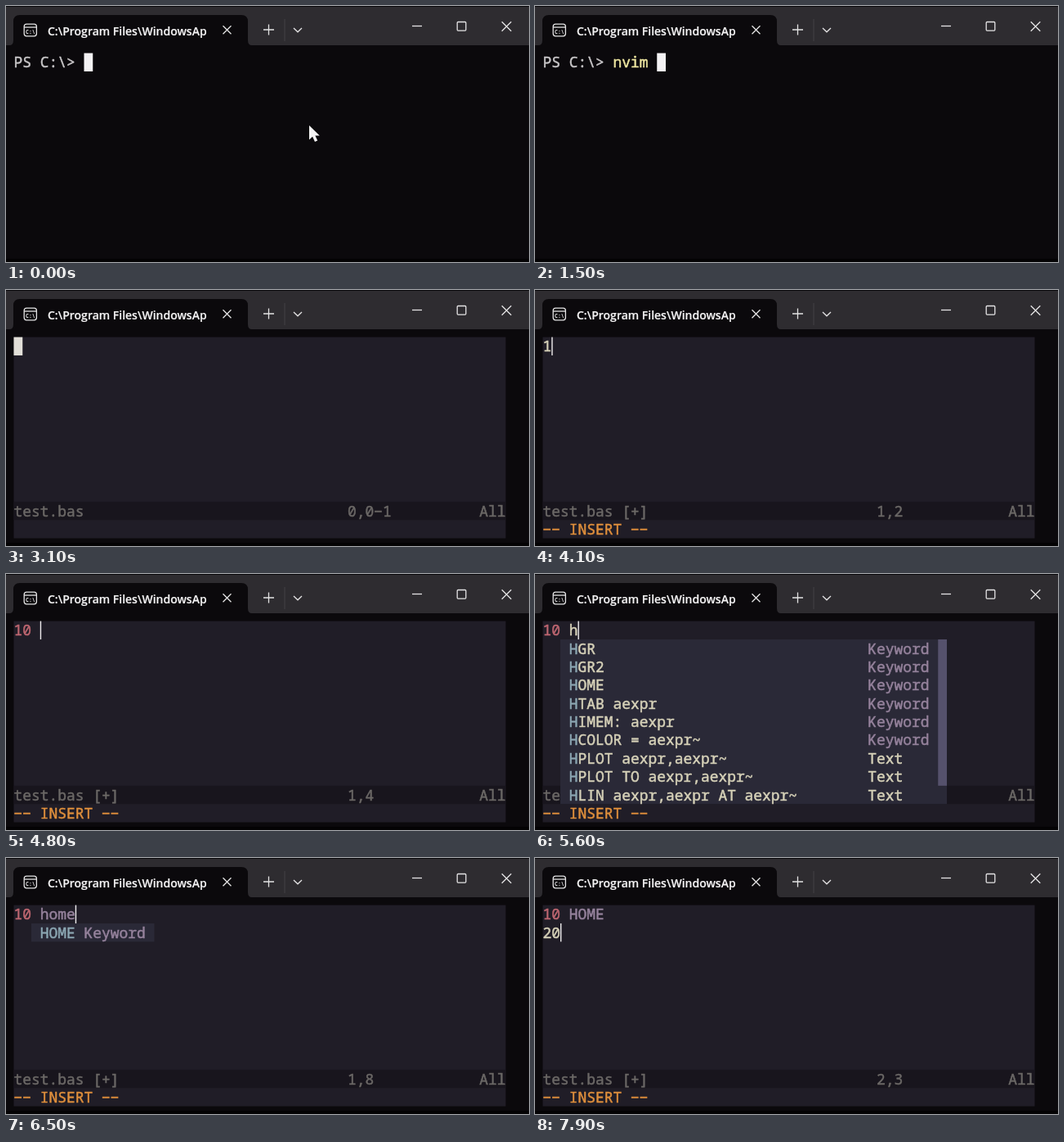
Animation of 640 by 313 pixels, one loop 8 s. Source, as an HTML page:

```html
<!DOCTYPE html>
<html lang="en">
<head>
<meta charset="utf-8">
<title>Terminal</title>
<style>
html, body { margin: 0; width: 100%; height: 100%; overflow: hidden; background: #0b090c; }
svg { display: block; width: 640px; height: 313px; }
text { white-space: pre; }
.mono { font: 500 17.92px "Noto Sans Mono", "DejaVu Sans Mono", monospace; stroke-width: 0.5; }
.title { font: 600 14px "Open Sans", "Noto Sans", sans-serif; fill: #f4f3f4; stroke: #f4f3f4; stroke-width: 0.2; }
.tiny { font: 700 6.5px "Noto Sans Mono", monospace; fill: #e8e7e8; }
.line { fill: none; stroke: #e4e3e4; stroke-width: 1.3; }
</style>
</head>
<body>
<svg viewBox="0 0 640 313">
  <rect width="640" height="313" fill="#0b090c"/>
  <rect width="640" height="48" fill="#2e2c30"/>
  <rect width="640" height="1" fill="#09080a"/>
  <rect y="309" width="640" height="4" fill="#040304"/>
  <path d="M4 48Q9 48 9 42V19Q9 11 17 11H288Q296 11 296 19V42Q296 48 301 48Z" fill="#0b090c"/>
  <rect class="line" x="22.2" y="22.2" width="15.2" height="14.6" rx="3"/>
  <path class="line" d="M22 26H37.5"/>
  <text class="tiny" x="24" y="33.6">C:\</text>
  <text class="title" x="51" y="35.8">C:\Program Files\WindowsAp</text>
  <path class="line" d="M265.5 24.3L275.5 34.3M275.5 24.3L265.5 34.3"/>
  <path class="line" d="M315 29H328M321.5 22.5V35.5"/>
  <path d="M341 16V43" stroke="#434145"/>
  <path class="line" d="M352 27L357 31.8L362 27"/>
  <path class="line" d="M497 24.5H509"/>
  <rect class="line" x="552.2" y="19.5" width="10.6" height="10.6" rx="1"/>
  <path class="line" d="M606.7 19.2L618.3 30.8M618.3 19.2L606.7 30.8"/>
  <g id="screen"></g>
  <path id="mouse" d="M371 146V163.6L375.1 159.8L378 166L381.2 164.6L378.4 158.6H383.8Z" fill="#f5f4f5"/>
</svg>
<script>
const LOOP = 8000, CW = 10.75, RH = 22.36, LEFT = 9.5, TOP = 57.6;
const C = {
  shell: "#c9c7c9", command: "#eee6a0", cursor: "#f4f2f4",
  bg: "#201d27", bar: "#18151d", dim: "#6b6866", fg: "#d6d1b8",
  red: "#bd6670", violet: "#95829c", orange: "#df8f3c",
  menu: "#2a2937", picked: "#3b3d55", match: "#8ba6b2", thumb: "#55516c"
};
const ITEMS = ["HGR", "HGR2", "HOME", "HTAB aexpr", "HIMEM: aexpr", "HCOLOR = aexpr~",
  "HPLOT aexpr,aexpr~", "HPLOT TO aexpr,aexpr~", "HLIN aexpr,aexpr AT aexpr~"];

// Each entry changes the state from its time on.
const STEPS = [
  [0, { mode: "shell", cmd: "", mouse: true }],
  [1100, { cmd: "n", mouse: false }],
  [1200, { cmd: "nv" }],
  [1300, { cmd: "nvi" }],
  [1400, { cmd: "nvim" }],
  [1500, { cmd: "nvim " }],
  [1600, { cmd: "nvim t" }],
  [2100, { cmd: "nvim test" }],
  [2200, { cmd: "nvim test.b" }],
  [2300, { cmd: "nvim test.bas" }],
  [2500, { entered: true }],
  [2600, { mode: "blank" }],
  [3100, { mode: "normal", lines: [""], numColor: C.fg, wordColor: C.fg }],
  [3700, { pending: "i" }],
  [4100, { mode: "insert", pending: "", lines: ["1"] }],
  [4200, { lines: ["10"] }],
  [4400, { numColor: C.red }],
  [4800, { lines: ["10 "] }],
  [5600, { lines: ["10 h"], query: "H" }],
  [5700, { lines: ["10 ho"] }],
  [5800, { query: "HO" }],
  [5900, { lines: ["10 hom"] }],
  [6000, { query: "HOM" }],
  [6100, { lines: ["10 home"] }],
  [6200, { query: "HOME" }],
  [6400, { wordColor: C.violet }],
  [6600, { lines: ["10 HOME"], selected: true }],
  [6800, { query: "" }],
  [7400, { lines: ["10 HOME", ""] }],
  [7800, { lines: ["10 HOME", "2"] }],
  [7900, { lines: ["10 HOME", "20"] }]
];

const x = col => LEFT + col * CW;
const y = row => TOP + row * RH;
const box = (row, col, cols, rows, fill) =>
  `<rect x="${x(col)}" y="${y(row)}" width="${cols * CW}" height="${rows * RH}" fill="${fill}"/>`;
const put = (row, col, str, fill) =>
  `<text class="mono" x="${x(col)}" y="${y(row) + 17.7}" fill="${fill}" stroke="${fill}">${
    str.replace(/&/g, "&amp;").replace(/</g, "&lt;")}</text>`;
const block = (row, col, fill) => box(row, col, 1, 1, fill);
const caret = (row, col) =>
  `<rect x="${x(col)}" y="${y(row)}" width="1.4" height="${RH}" fill="#efedee"/>`;

function shell(s) {
  const end = 8 + s.cmd.length;
  return put(0, 0, "PS C:\\>", C.shell) +
    put(0, 8, s.cmd.slice(0, 4), C.command) +
    put(0, 12, s.cmd.slice(4), C.shell) +
    (s.entered ? block(1, 0, C.cursor) : block(0, end, C.cursor));
}

// Positions of the query letters, taken in order.
function matches(item, query) {
  const hits = [];
  let at = -1;
  for (const ch of query) {
    at = item.indexOf(ch, at + 1);
    if (at < 0) return null;
    hits.push(at);
  }
  return hits;
}

function menu(s) {
  const full = s.query === "H";
  const found = ITEMS.filter(item => matches(item, s.query));
  const kindCol = full ? 37 : 4 + Math.max(...found.map(item => item.length));
  let out = box(1, 2, kindCol + 6 + full, found.length, s.selected ? C.picked : C.menu);
  if (full) out += box(1, 45, 1, found.length - 1, C.thumb);
  found.forEach((item, i) => {
    const hits = matches(item, s.query);
    const isText = /^H(PLOT|LIN)/.test(item);
    const hit = [...item].map((ch, k) => hits.includes(k) ? ch : " ").join("");
    const rest = [...item].map((ch, k) => hits.includes(k) ? " " : ch).join("");
    out += put(i + 1, 3, rest, C.fg) + put(i + 1, 3, hit, C.match) +
      put(i + 1, kindCol, isText ? "Text" : "Keyword", isText ? C.fg : C.violet);
  });
  return out;
}

function editor(s) {
  const insert = s.mode === "insert";
  const row = s.lines.length - 1, col = s.lines[row].length;
  const pos = insert ? `${row + 1},${col + 1}` : "0,0−1";
  let out = box(0, 0, 56, 11, C.bg) + box(9, 0, 56, 1, C.bar) +
    put(9, 0, "test.bas" + (insert ? " [+]" : ""), C.dim) +
    put(9, 38, pos, C.dim) + put(9, 53, "All", C.dim);
  if (insert) out += put(10, 0, "−− INSERT −−", C.orange);
  if (s.pending) out += put(10, 45, s.pending, C.fg);
  s.lines.forEach((line, i) => {
    out += put(i, 0, line.slice(0, 2), i ? C.fg : s.numColor) +
      put(i, 3, line.slice(3), s.wordColor);
  });
  if (s.query) out += menu(s);
  return out + (insert ? caret(row, col) : block(0, 0, "#e2dfd8"));
}

const screen = document.getElementById("screen");
const mouse = document.getElementById("mouse");
let shown = -1;

function draw(t) {
  const count = STEPS.filter(step => step[0] <= t).length;
  if (count === shown) return;
  shown = count;
  const s = Object.assign({}, ...STEPS.slice(0, count).map(step => step[1]));
  mouse.style.display = s.mouse ? "" : "none";
  screen.innerHTML = s.mode === "shell" ? shell(s)
    : s.mode === "blank" ? block(0, 0, C.cursor)
    : editor(s);
}

const start = performance.now();
function tick() {
  draw((performance.now() - start) % LOOP);
  requestAnimationFrame(tick);
}
tick();
</script>
</body>
</html>
```
